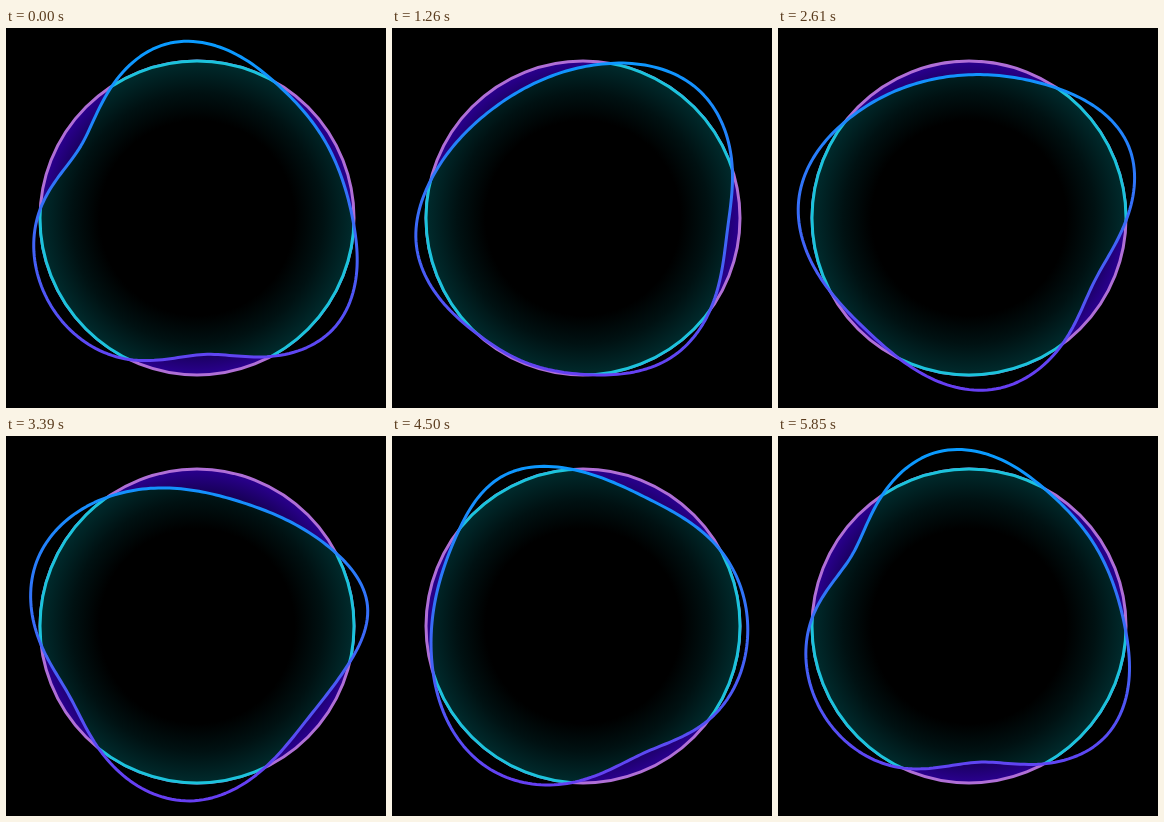
Write an HTML page that moves like this. It is 380 px wide and 380 px high and loops after 5880 ms.

```html
<!DOCTYPE html>
<html lang="en">
<head>
<meta charset="utf-8">
<title>Wobbling ring</title>
<style>
  html, body { margin: 0; width: 100%; height: 100%; overflow: hidden; background: #000; }
  svg { display: block; width: 100vw; height: 100vh; }
</style>
</head>
<body>
<svg viewBox="0 0 380 380">
  <defs>
    <radialGradient id="violet" gradientUnits="userSpaceOnUse" cx="191" cy="190" r="157">
      <stop offset=".62" stop-color="#000"/>
      <stop offset=".84" stop-color="#160054"/>
      <stop offset="1" stop-color="#2a0090"/>
    </radialGradient>
    <radialGradient id="teal" gradientUnits="userSpaceOnUse" cx="191" cy="190" r="157">
      <stop offset=".62" stop-color="#000"/>
      <stop offset=".8" stop-color="#001112"/>
      <stop offset="1" stop-color="#002b2d"/>
    </radialGradient>
    <linearGradient id="edge" gradientUnits="userSpaceOnUse" x1="0" y1="20" x2="0" y2="350">
      <stop offset="0" stop-color="#0a9bff"/>
      <stop offset="1" stop-color="#663ff2"/>
    </linearGradient>
    <clipPath id="inside"><path class="blob"/></clipPath>
  </defs>
  <g stroke-width="3">
    <circle cx="191" cy="190" r="157" fill="url(#violet)" stroke="#b06fd6"/>
    <g clip-path="url(#inside)">
      <circle cx="191" cy="190" r="157" fill="#000"/>
      <circle cx="191" cy="190" r="157" fill="url(#teal)" stroke="#1cc3dc"/>
    </g>
    <path class="blob" fill="none" stroke="url(#edge)" stroke-linejoin="round"/>
  </g>
</svg>
<script>
const LOOP = 5880, CX = 191, CY = 190, R = 157, NODES = 12, STEPS = 240;

// Each pose: time, angles of the crossings with the circle (rising, falling, ...),
// angles of the crests and troughs that follow them, and their heights.
const poses = [
  { t: 0, cross: [237.2, 299, 362.6, 421.8, 475.7, 543.3],
    peak: [260, 326, 400, 446, 512, 571], high: [19.7, -7.5, 18.5, -20.3, 13.3, -20.3] },
  { t: 1260, cross: [280, 342, 396, 447, 492.7, 553.7],
    peak: [312, 364, 417, 472, 531, 588], high: [15.5, -12, 8, -1.5, 11.8, -15] },
  { t: 2610, cross: [304.4, 361, 413.6, 476.2, 512, 577.7],
    peak: [336, 387, 441, 493, 547, 627], high: [18, -16.5, 16, -5, 14.2, -14] },
  { t: 3390, cross: [332.3, 373.2, 424.3, 488.8, 533, 595],
    peak: [353, 401, 452, 512, 562, 649], high: [14.7, -12.5, 18, -11.5, 15.8, -25.5] },
  { t: 4500, cross: [331.3, 396.6, 454, 522.6, 578, 626],
    peak: [366, 423, 485, 550, 601, 658], high: [8, -16, 13.8, -7, 13, -14] },
  { t: 5340, cross: [363.6, 415.4, 471, 537, 590.7, 647.5],
    peak: [392, 445, 503, 567, 612, 687], high: [11, -15, 13.8, -13, 14.4, -5] }
];

function hermite(a, b, da, db, u) {
  const u2 = u * u, u3 = u2 * u;
  return a * (2 * u3 - 3 * u2 + 1) + da * (u3 - 2 * u2 + u)
       + b * (3 * u2 - 2 * u3) + db * (u3 - u2);
}

// Every loop turns the shape by a third, so node i takes the place of node i + 4.
function keyAt(k) {
  const cycle = Math.floor(k / poses.length), p = poses[k - cycle * poses.length];
  const nodes = [];
  for (let i = 0; i < NODES; i++) {
    const n = i + 4 * cycle, wrap = Math.floor(n / NODES), m = n - wrap * NODES;
    const half = m >> 1, isPeak = m % 2;
    nodes.push([(isPeak ? p.peak : p.cross)[half] + 360 * wrap, isPeak ? p.high[half] : 0]);
  }
  return { t: p.t + cycle * LOOP, nodes };
}

function nodesAt(t) {
  let k = poses.length - 1;
  while (poses[k].t > t) k--;
  const [a, b, c, d] = [k - 1, k, k + 1, k + 2].map(keyAt);
  const span = c.t - b.t, u = (t - b.t) / span;
  return b.nodes.map((node, i) => node.map((v, j) => {
    const w = c.nodes[i][j];
    const before = (w - a.nodes[i][j]) / (c.t - a.t) * span;
    const after = (d.nodes[i][j] - v) / (d.t - b.t) * span;
    return hermite(v, w, before, after, u);
  }));
}

// Slopes of the closed cubic spline through the nodes, found by relaxation.
function splineSlopes(nodes) {
  const next = i => (i + 1) % NODES, prev = i => (i + NODES - 1) % NODES;
  const gap = nodes.map(([a], i) => (nodes[next(i)][0] - a + 360) % 360);
  const rise = nodes.map(([, h], i) => (nodes[next(i)][1] - h) / gap[i]);
  const m = nodes.map(() => 0);
  for (let pass = 0; pass < 20; pass++) {
    for (let i = 0; i < NODES; i++) {
      const p = prev(i), g = gap[p], h = gap[i];
      m[i] = (3 * (h * rise[p] + g * rise[i]) - h * m[p] - g * m[next(i)]) / (2 * (g + h));
    }
  }
  return m;
}

function outline(t) {
  const nodes = nodesAt(t), slopes = splineSlopes(nodes);
  const knots = nodes.map(([angle, h], i) => [angle, h, slopes[i]]);
  knots.push([knots[0][0] + 360, knots[0][1], knots[0][2]]);
  const points = [];
  let n = 0;
  for (let s = 0; s < STEPS; s++) {
    const angle = knots[0][0] + 360 * s / STEPS;
    while (knots[n + 1][0] <= angle) n++;
    const [a0, h0, m0] = knots[n], [a1, h1, m1] = knots[n + 1], span = a1 - a0;
    const r = R + hermite(h0, h1, m0 * span, m1 * span, (angle - a0) / span);
    const rad = angle * Math.PI / 180;
    points.push((CX + r * Math.cos(rad)).toFixed(2) + " " + (CY + r * Math.sin(rad)).toFixed(2));
  }
  return "M" + points.join("L") + "Z";
}

const blobs = document.querySelectorAll(".blob");
const start = performance.now();
function draw() {
  const d = outline((performance.now() - start) % LOOP);
  blobs.forEach(b => b.setAttribute("d", d));
  requestAnimationFrame(draw);
}
draw();
</script>
</body>
</html>
```
